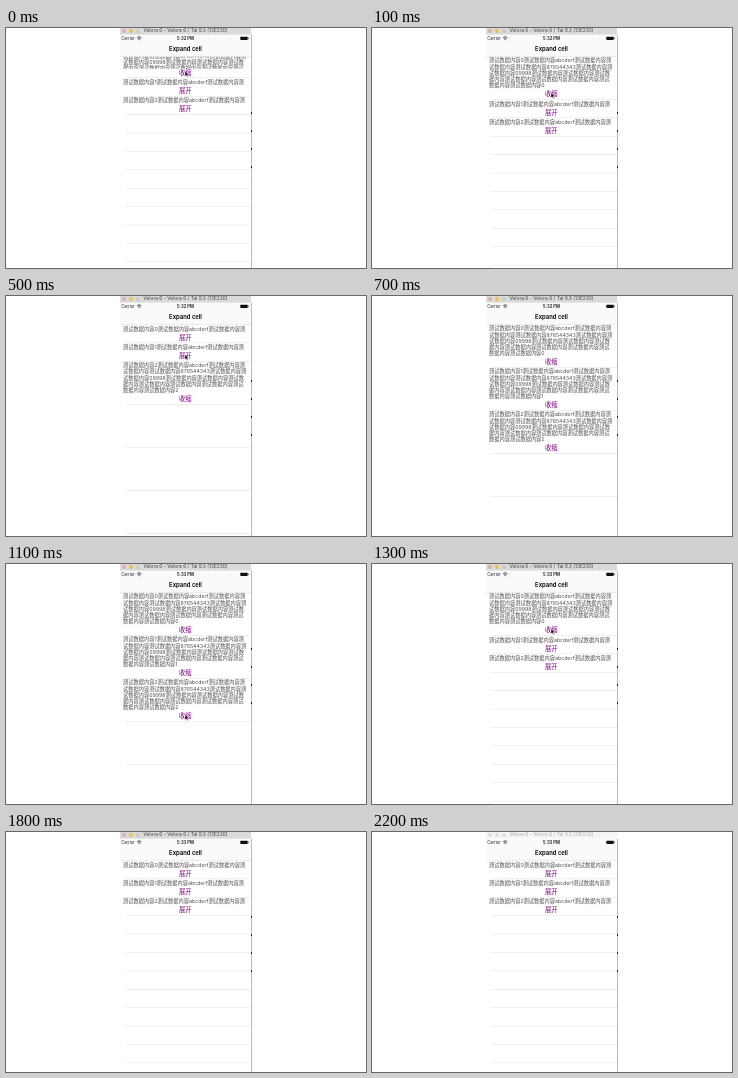
Recreate the animation shown at these times as an HTML page. Size 360 px wide and 240 px high, loop 2400 ms.

```html
<!DOCTYPE html>
<html lang="zh-CN">
<head>
<meta charset="utf-8">
<title>Expand cell</title>
<style>
  html, body { margin: 0; width: 100%; height: 100%; overflow: hidden; background: #fff; }
  svg { display: block; width: 100vw; height: 100vh; }
  text { font-family: Inter, "Noto Sans CJK SC", "Noto Sans CJK", sans-serif; white-space: pre; }
</style>
</head>
<body>
<svg id="stage" viewBox="0 0 360 240"></svg>
<script>
const stage = document.getElementById('stage');
const STEP = 100, LOOP = 2400, LAST = 22;
const LEFT = 114, RIGHT = 245, WIDTH = RIGHT - LEFT, MID = 179.5, TOP = 28.5;
const CLOSED = 18.4, OPEN = 43, PITCH = 6.25;

// One character per step: the cell whose button is tapped, or a dot
const taps = '0.011210....210';

// Every tap toggles its cell; the first one has only begun to open
function cells(step) {
  const past = taps.slice(0, step + 1);
  let y = TOP;
  return [0, 1, 2].map(id => {
    const open = (past.split(id).length - 1) % 2 * (step ? 1 : .12);
    const h = CLOSED + (OPEN - CLOSED) * open;
    y += h;
    return { id, open, h, y: y - h };
  });
}

// The pointer waits on the button it taps within two steps, then leaves
function pointerAt(step, rows) {
  const next = taps.slice(step + 1, step + 3).match(/\d/);
  if (next) return [179, rows[next[0]].y + rows[next[0]].h - 6.7];
  return step === taps.length - 1 ? [163, 35] : null;
}

const rect = (x, y, w, h, fill, more = '') =>
  `<rect x="${x}" y="${y}" width="${w}" height="${h}" fill="${fill}" ${more}/>`;
const dot = (x, y, r, fill) => `<circle cx="${x}" cy="${y}" r="${r}" fill="${fill}"/>`;
// Text centred vertically on y
const label = (s, x, y, size, fill, more = '') =>
  `<text x="${x}" y="${y + size * .36}" font-size="${size}" fill="${fill}" ${more}>${s}</text>`;
const mid = 'text-anchor="middle"', bold = mid + ' font-weight="600"';

const unit = '测试数据内容';
const lines = n => [
  unit + n + unit + 'abcderf' + unit + '测',
  '试数据内容' + unit + '876544343' + unit + '测',
  '试数据内容09998' + unit + unit + '测试数',
  '据内容' + unit.repeat(3) + '测试',
  '数据内容' + unit + n
];

function titleBar(active) {
  const lights = active ? ['#e2aaa5', '#eec04a', '#c9c9c9'] : Array(3).fill('#ddd');
  return rect(LEFT, 0, WIDTH, 6.6, active ? '#dadada' : '#f5f5f5') +
    lights.map((c, i) => dot(118 + i * 7, 3, 1.9, c)).join('') +
    label('Velora 6 - Velora 6 / Tal 9.3 (13E230)', MID, 2.7, 4.85, active ? '#444' : '#aaa', mid);
}

function header(step) {
  const arc = r => `<path d="M${133.2 - r * .75} ${12 - r * .75}a${r * 1.06} ${r * 1.06} 0 0 1 ${r * 1.5} 0" fill="none" stroke="#222" stroke-width=".7"/>`;
  return rect(LEFT, 6.6, WIDTH, 21.9, '#fafafa') +
    rect(LEFT, 28.2, WIDTH, .4, '#d0d0d0') +
    label('Carrier', 115.2, 10.3, 4.2, '#222') +
    arc(3) + arc(1.8) + dot(133.2, 11.6, .6, '#222') +
    label(step < 9 ? '5:32 PM' : '5:33 PM', MID, 10.2, 4.25, '#111', bold) +
    rect(234.3, 8.7, 7.4, 3.2, '#111', 'rx=".6"') + rect(242, 9.6, .6, 1.4, '#111') +
    label('Expand cell', MID, 21.1, 5.9, '#000', bold);
}

const divider = y => rect(119.2, y - .3, RIGHT - 119.2, .5, '#dedede');

function cell({ id, open, h, y }) {
  const shown = lines(id).slice(0, open ? 5 : 1);
  // The text block stays centred in its box and is clipped by it
  const first = y + (h - 10) / 2 - (shown.length - 1) * PITCH / 2;
  return `<clipPath id="box${id}">${rect(LEFT, y, WIDTH, h - 9, '#000')}</clipPath><g clip-path="url(#box${id})">` +
    shown.map((s, j) => label(s, 117, first + j * PITCH, 5.24, '#505050')).join('') + '</g>' +
    label(open ? '收缩' : '展开', 179.3, y + h - 5.6, 6.3, '#800080', mid) + divider(y + h);
}

// Empty rows repeat the height of the last cell
function emptyRows({ y, h }) {
  let out = '';
  for (let row = y + 2 * h; row < 240; row += h) out += divider(row);
  return out;
}

const pointer = ([x, y]) =>
  `<path transform="translate(${x} ${y})" d="M0 0v5l1.2-1.1 .9 2 .9-.4-.9-1.9h1.6z" fill="#000" stroke="#fff" stroke-width=".4"/>`;

// Shadowed window edge with a few dark marks
let edge = rect(RIGHT, 6.6, .8, 233.4, '#aaa');
for (let y = 84; y < 150; y += 18) edge += rect(RIGHT, y, 1, 2, '#222');

let last = -1;
function draw(now) {
  const step = Math.min(LAST, Math.floor(now % LOOP / STEP));
  if (step !== last) {
    const rows = cells(step), tip = pointerAt(step, rows);
    stage.innerHTML = rows.map(cell).join('') + emptyRows(rows[2]) +
      header(step) + titleBar(step < 21) + edge + (tip ? pointer(tip) : '');
    last = step;
  }
  requestAnimationFrame(() => draw(performance.now()));
}
draw(performance.now());
</script>
</body>
</html>
```
